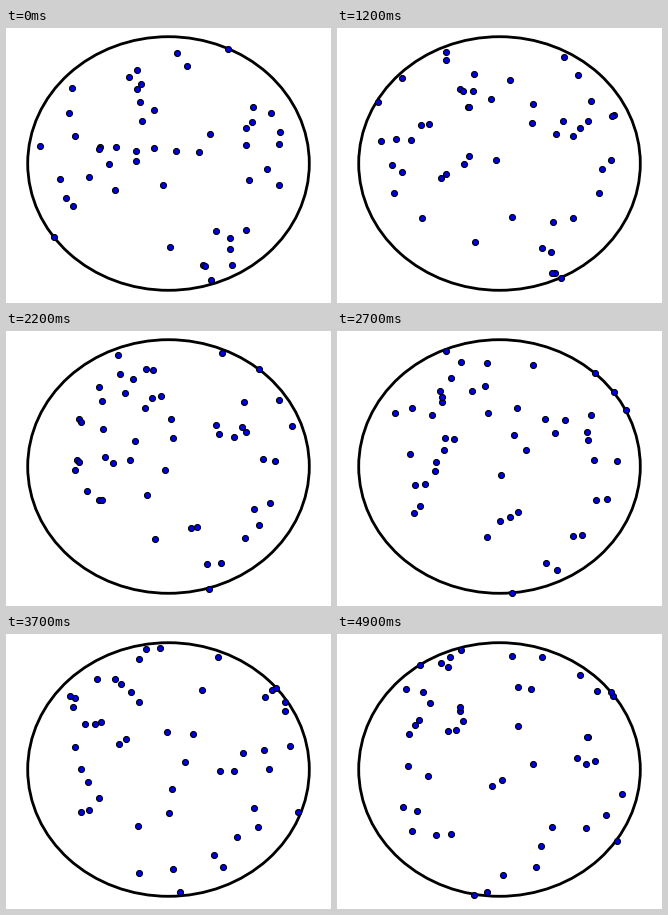
Recreate the animation shown at these times as a matplotlib script. Size 325 by 275 pixels, loop 5 s.

```python
import numpy as np
import matplotlib.pyplot as plt
from matplotlib.animation import FuncAnimation
from matplotlib.patches import Ellipse

WIDTH, HEIGHT, DPI = 325, 275, 100
FRAMES, INTERVAL = 50, 100
CENTER = np.array([162.5, 135.5])
RADII = np.array([140.8, 126.8])
STEP = 5.5

START = np.array([
    (170, 24), (180, 37), (221, 20), (130, 41), (122, 48), (134, 55), (130, 60),
    (65, 59), (133, 73), (147, 81), (135, 92), (62, 84), (68, 107), (33, 117),
    (93, 118), (92, 120), (109, 118), (129, 122), (129, 132), (147, 119),
    (169, 122), (192, 123), (203, 105), (102, 135), (53, 150), (82, 148),
    (108, 161), (59, 169), (66, 177), (47, 208), (156, 156), (246, 78),
    (264, 84), (245, 93), (239, 99), (239, 116), (273, 103), (272, 115),
    (260, 140), (242, 151), (272, 156), (209, 202), (239, 201), (223, 209),
    (223, 220), (225, 236), (163, 218), (196, 236), (198, 237), (204, 251),
], dtype=float)


def px(size):
    """Convert pixels to points."""
    return size * 72 / DPI


def keep_inside(points):
    """Project points that left the ellipse back onto its wall."""
    offset = (points - CENTER) / RADII
    distance = np.linalg.norm(offset, axis=1, keepdims=True)
    return CENTER + RADII * offset / np.maximum(distance, 1)


def random_walk():
    rng = np.random.default_rng(7)
    path = [START]
    for _ in range(FRAMES - 1):
        path.append(keep_inside(path[-1] + rng.normal(0, STEP, START.shape)))
    return path


path = random_walk()

fig = plt.figure(figsize=(WIDTH / DPI, HEIGHT / DPI), dpi=DPI, facecolor="white")
ax = fig.add_axes([0, 0, 1, 1])
ax.set_xlim(0, WIDTH)
ax.set_ylim(HEIGHT, 0)
ax.axis("off")

ax.add_patch(Ellipse(CENTER, *(2 * RADII), fill=False, edgecolor="black",
                     linewidth=px(2.8), zorder=1))
dots = ax.scatter(START[:, 0] + 0.5, START[:, 1] + 0.5, s=px(6) ** 2,
                  facecolor="#0000e6", edgecolor="black",
                  linewidth=px(1.1), zorder=2)


def draw(frame):
    dots.set_offsets(path[frame] + 0.5)
    return (dots,)


animation = FuncAnimation(fig, draw, frames=FRAMES, interval=INTERVAL,
                          repeat=True, repeat_delay=0)
plt.show()
```
